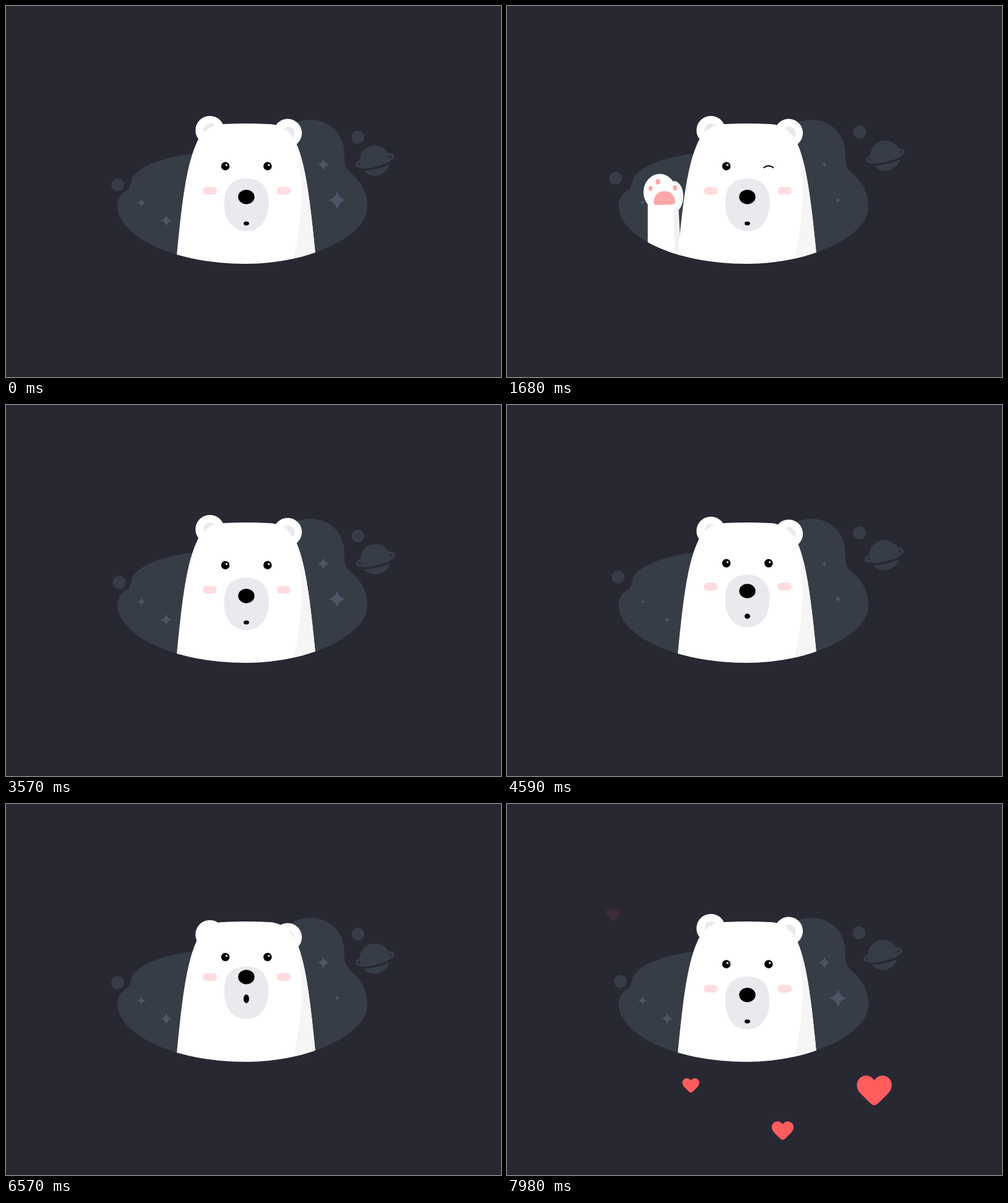
Recreate the animation shown at these times as an HTML page with a canvas. Size 800 by 600 pixels, loop 8 s.

```html
<!DOCTYPE html>
<html lang="en">
<head>
<meta charset="utf-8">
<title>Polar bear</title>
<style>
  html, body { margin: 0; width: 100%; height: 100%; overflow: hidden; background: #282833; }
  canvas { display: block; }
</style>
</head>
<body>
<canvas id="stage" width="800" height="600"></canvas>
<script>
const ctx = document.getElementById('stage').getContext('2d');
const LOOP = 8000;
const BG = '#282833', SPACE = '#363d47', STAR = '#515366', GREY = '#e8eaed', SHADE = '#f5f5f5';

const BOTTOM = 'C584 372 490 417 388 417 C270 417 180 372 180 322';
const paths = {
  cloud: new Path2D('M584 325 ' + BOTTOM +
    ' C181 308 189 302 196 298 C202 294 200 287 204 279 C214 258 262 242 310 238' +
    ' L420 238 C445 210 455 184 492 184 C522 184 547 206 547 240' +
    ' C545 257 550 264 562 274 C576 287 584 304 584 325 Z'),
  window: new Path2D('M0 0 H800 V325 H584 ' + BOTTOM + ' H0 Z'),
  head: new Path2D('M275 414 C283 330 290 262 307 224 C313 209 326 192 351 191' +
    ' Q388 189 425 191 C450 192 463 209 470 224 C486 262 493 330 501 410 V430 H275 Z'),
  headShade: new Path2D('M471 224 Q486.5 320 464 412 L510 412 L500 320 Z'),
  muzzle: new Path2D('M388.5 279 C413 279 424.5 294 424.5 318 C424.5 346 411 364 388.5 364' +
    ' C366 364 352.5 346 352.5 318 C352.5 294 364 279 388.5 279 Z'),
  pad: new Path2D('M237 316 C238 305 245 299.5 255 299.5 C264 299.5 271 306 272 316' +
    ' Q272 321 267 321 L242 322 Q237 322 237 316 Z'),
  heart: new Path2D('M0 .43 C-.06 .43 -.12 .37 -.2 .29 L-.4 .09 C-.54 -.06 -.53 -.25 -.42 -.35' +
    ' C-.29 -.47 -.1 -.44 0 -.29 C.1 -.44 .29 -.47 .42 -.35 C.53 -.25 .54 -.06 .4 .09' +
    ' L.2 .29 C.12 .37 .06 .43 0 .43 Z')
};

const clamp = v => Math.max(0, Math.min(1, v));
const mix = (a, b, u) => a + (b - a) * u;
const wave = u => (1 - Math.cos(Math.PI * u)) / 2;
const ease = (t, from, to) => wave(clamp((t - from) / (to - from)));

function ellipse(x, y, rx, ry, color) {
  ctx.fillStyle = color;
  ctx.beginPath();
  ctx.ellipse(x, y, rx, ry, 0, 0, 2 * Math.PI);
  ctx.fill();
}

const dot = (x, y, r, color) => ellipse(x, y, r, r, color);

function fill(path, color) {
  ctx.fillStyle = color;
  ctx.fill(path);
}

function layer(draw) {
  ctx.save();
  draw();
  ctx.restore();
}

function star(x, y, r) {
  const c = r * 0.17;
  ctx.fillStyle = STAR;
  ctx.beginPath();
  ctx.moveTo(x, y - r);
  ctx.quadraticCurveTo(x + c, y - c, x + r, y);
  ctx.quadraticCurveTo(x + c, y + c, x, y + r);
  ctx.quadraticCurveTo(x - c, y + c, x - r, y);
  ctx.quadraticCurveTo(x - c, y - c, x, y - r);
  ctx.fill();
}

function planet(x, y) {
  layer(() => {
    ctx.translate(x, y);
    dot(0, 0, 24.5, SPACE);
    ctx.rotate(-0.24);
    const ring = (dy, width, color, end) => {
      ctx.strokeStyle = color;
      ctx.lineWidth = width;
      ctx.beginPath();
      ctx.ellipse(0, dy, 30.5, 7.5, 0, 0, end);
      ctx.stroke();
    };
    ring(4.5, 3.5, BG, Math.PI);
    ring(0, 4, SPACE, 2 * Math.PI);
  });
}

// Shrink amount around each listed moment
function dip(t, times) {
  return times.reduce((m, c) => Math.max(m, wave(1 - clamp(Math.abs(t - c) / 1050))), 0);
}

function space(t) {
  fill(paths.cloud, SPACE);
  const now = Math.min(t, 6570);
  const late = ease(t, 7400, 8080);

  const turn = (66 - 360 * now / 3285 - 36 * late) * Math.PI / 180;
  dot(178.2 + 5.8 * Math.cos(turn), 283.7 + 5.8 * Math.sin(turn), 10.5, SPACE);

  const lift = wave(Math.max(0, now - 430) / 1650);
  dot(568.7 + 1.4 * lift, 212 - 9.3 * lift - 2 * late, 10.5, SPACE);

  const drift = t < 6570 ? wave(now / 1642) : 0.8 * late;
  planet(596 + 15.3 * drift, 250 - 8 * drift);

  const small = dip(t, [1640, 4600]);
  const tail = t > 6570 ? 1 - ease(t, 7380, 7960) : dip(t, [1640, 4400, 6570]);
  star(219, 318, mix(7, 4, small));
  star(259, 347, mix(9.5, 4.5, small));
  star(513, 256.5, mix(9.5, 4.8, small));
  star(535, 314, mix(14.8, 4.6, tail));
}

function paw(t) {
  const hidden = 150 * (1 - ease(t, 60, 720) + ease(t, 2200, 2718));
  if (hidden >= 150) return;
  const swing = t > 760 && t < 1680
    ? Math.sin((t - 760) / 920 * 4 * Math.PI) * 0.05 : 0;
  layer(() => {
    ctx.translate(250, 400 + hidden);
    ctx.rotate(swing);
    ctx.translate(-250, -400);
    ellipse(270, 308, 15, 25, SHADE);
    ctx.fillStyle = '#f1f1f1';
    ctx.fill(new Path2D('M262 320 H277 L283 440 H262 Z'));
    ctx.fillStyle = '#fff';
    ctx.fill(new Path2D('M227.5 310 H267 Q271 350 271 440 H227.5 Z'));
    ellipse(247, 301, 26.5, 29.5, '#fff');
    ellipse(266, 307, 13, 23, '#fff');
    fill(paths.pad, '#ffa6a8');
    [[232, 295, 3.4, 4], [243.8, 284.3, 3.7, 4.4], [271.5, 294, 3.4, 4.2]]
      .forEach(toe => ellipse(...toe, '#ffa6a8'));
  });
}

function eye(x, y) {
  dot(x, y, 6.8, '#000');
  dot(x + 1.9, y - 1.8, 1.6, '#fff');
}

function cheek(x, y) {
  ctx.fillStyle = '#ffdcdf';
  ctx.beginPath();
  ctx.roundRect(x - 11.3, y - 6.3, 22.6, 12.6, 6);
  ctx.fill();
}

function face(t, tilt) {
  const eyeY = 259 - 11.5 * tilt;
  eye(354.5, eyeY);
  if (t > 1350 && t < 2050) {
    ctx.strokeStyle = '#000';
    ctx.lineWidth = 1.8;
    ctx.lineCap = 'round';
    ctx.beginPath();
    ctx.moveTo(415, 261.5);
    ctx.quadraticCurveTo(423, 255.5, 430.5, 261.5);
    ctx.stroke();
  } else {
    eye(422.8, eyeY);
  }
  cheek(329.2, 298.8 - 19 * tilt);
  cheek(448.8, 298.8 - 19 * tilt);
  layer(() => {
    ctx.translate(0, -16.2 * tilt);
    fill(paths.muzzle, GREY);
  });
  ellipse(388.4, 308.8 - 29 * tilt, 13.2, 11.6, '#000');
  ellipse(388.4, 351.7 - 36.7 * tilt, 4.5, 3.1 + 3.8 * tilt, '#000');
}

function bear(t) {
  const tilt = ease(t, 4370, 5000) - ease(t, 5000, 5720) +
    ease(t, 5850, 6540) - ease(t, 6640, 7220);
  const pulse = (from, len) => Math.sin(Math.PI * clamp((t - from) / len));
  const lean = pulse(60, 480) + pulse(2460, 480);
  const drop = 10 * tilt;

  layer(() => {
    ctx.clip(paths.window);
    paw(t);
    const leftX = 329.5 - 3.5 * lean, leftY = 201 + drop + 1.5 * lean;
    const rightX = 455.2 - 2 * lean, rightY = 205.5 + drop - lean;
    dot(leftX, leftY, 23.3, '#fff');
    dot(rightX, rightY, 23, '#fff');
    ellipse(leftX + 0.3, leftY + 0.2, 10.5, 11.5, GREY);
    ellipse(rightX + 0.8, rightY + 1, 10.5, 11.5, GREY);
    fill(paths.head, '#fff');
    ctx.clip(paths.head);
    fill(paths.headShade, SHADE);
  });
  face(t, tilt);
}

// Each heart: end position, width, launch time, closing opacity
const hearts = [
  [445.5, 528, 35, 6960, 1],
  [297.2, 455, 27, 7250, 1],
  [593.5, 463, 56, 7300, 1],
  [171.5, 179.5, 23, 7330, 0.1]
];

function burst(t) {
  hearts.forEach(([x, y, size, start, end]) => {
    if (t <= start) return;
    const u = (t - start) / (7980 - start);
    const go = u * (1.5 - 0.5 * u);
    const s = size * clamp(u * 2.2);
    layer(() => {
      ctx.globalAlpha = mix(1, end, clamp((u - 0.5) * 2));
      ctx.translate(mix(388, x, go), mix(350, y, go));
      ctx.scale(s, s);
      fill(paths.heart, '#ff5c5e');
    });
  });
}

function draw() {
  const t = performance.now() % LOOP;
  ctx.fillStyle = BG;
  ctx.fillRect(0, 0, 800, 600);
  space(t);
  bear(t);
  burst(t);
  requestAnimationFrame(draw);
}

draw();
</script>
</body>
</html>
```
